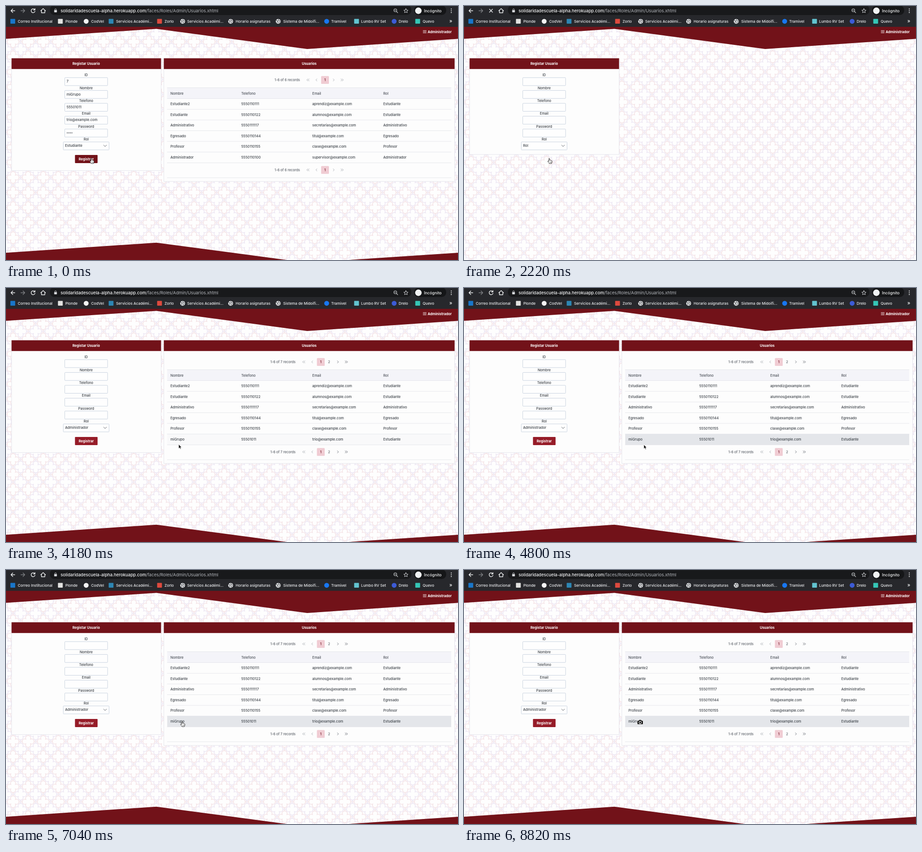
These frames come from a looping animation (998x561 px, 8920 ms). An HTML page:

```html
<!DOCTYPE html>
<html lang="es">
<head>
<meta charset="utf-8">
<title>Usuarios</title>
<style>
html, body { margin: 0; width: 100%; height: 100%; overflow: hidden; background: #fefefe; }
svg { display: block; width: 100%; height: 100%; }
text { font-family: Inter, "Open Sans", sans-serif; white-space: pre; }
</style>
</head>
<body>
<svg id="stage" viewBox="0 0 998 561" preserveAspectRatio="none">
  <defs>
    <path id="flower" d="M-5-5A5.6 5.6 0 1 1 5-5A5.6 5.6 0 1 1 5 5A5.6 5.6 0 1 1-5 5A5.6 5.6 0 1 1-5-5ZM-17 0H-13M13 0H17M0-17V-13M0 13V17"/>
    <pattern id="tiles" x="-1" y="62.3" width="33.3" height="33.3" patternUnits="userSpaceOnUse">
      <g fill="none" stroke-width="1.1">
        <use href="#flower" x="16.65" y="16.65" stroke="#f1d9dd"/>
        <g stroke="#e6ddef">
          <use href="#flower"/>
          <use href="#flower" x="33.3"/>
          <use href="#flower" y="33.3"/>
          <use href="#flower" x="33.3" y="33.3"/>
        </g>
      </g>
    </pattern>
  </defs>
  <rect width="998" height="561" fill="#fefefe"/>
  <rect y="46" width="998" height="515" fill="url(#tiles)"/>
  <path fill="#721219" d="M0 46H998V72.5L665 95L332 50.5L0 72.5Z"/>
  <path id="footer" fill="#721219" d="M0 561V545L332 522.7L620 561ZM756 561L998 545V561Z"/>
  <g id="page"></g>
  <g id="chrome"></g>
  <g id="hand" fill="#fff" stroke="#111" stroke-width=".9" stroke-linejoin="round">
    <path d="M-1.2 0C-1.2-1.4.8-1.4.8 0V3.2C1.4 2.6 2.5 2.8 2.6 3.6C3.2 3 4.2 3.3 4.3 4.1C5 3.7 5.9 4.1 5.9 5V7.2C5.9 8.6 4.9 9 4.8 10.4H-.4C-.8 8.8-2.8 7.4-3.5 5.9C-3.9 4.9-2.6 4.3-1.2 5.8Z"/>
    <path d="M1.2 6.3V8.6M2.7 6.3V8.6M4.1 6.3V8.6" fill="none" stroke-width=".5"/>
  </g>
  <path id="arrow" d="M0 0V9.3L2.2 7.3L3.7 10.7L5.3 10L3.9 6.7H6.7Z" fill="#111" stroke="#fff" stroke-width=".8"/>
  <g id="camera" stroke="#fff" stroke-width=".8">
    <path d="M-6.3-3.3H-3.4L-2.2-5.2H2.2L3.4-3.3H6.3V5H-6.3Z" fill="#0a0a0a" stroke-linejoin="round"/>
    <circle cy=".7" r="2.6" fill="#0a0a0a" stroke-width="1.1"/>
  </g>
</svg>
<script>
const LOOP = 8920, LOAD = 900, PARTIAL = 2140, READY = 2540;
const MAROON = '#721219', INK = '#3b4047', SOFT = '#5b6068', LINE = '#e5e5ec';
const $ = id => document.getElementById(id);

function add(parent, tag, attrs, content) {
  const el = document.createElementNS('http://www.w3.org/2000/svg', tag);
  for (const key in attrs) el.setAttribute(key, attrs[key]);
  if (content !== undefined) el.textContent = content;
  parent.appendChild(el);
  return el;
}
const group = parent => add(parent, 'g', {});
const rect = (p, x, y, width, height, fill, more) => add(p, 'rect', { x, y, width, height, fill, ...more });
const path = (p, d, stroke, width = 1, more) =>
  add(p, 'path', { d, fill: 'none', stroke, 'stroke-width': width, 'stroke-linecap': 'round', 'stroke-linejoin': 'round', ...more });
const label = (p, x, y, str, size = 7.6, weight = 550, fill = INK, anchor = 'start') =>
  add(p, 'text', { x, y: y + size * .36, 'font-size': size, 'font-weight': weight, fill, 'text-anchor': anchor }, str);
const title = (p, x, y, str) => label(p, x, y, str, 7.5, 700, '#fff', 'middle');
const show = (el, on) => el.setAttribute('display', on ? 'inline' : 'none');

// Browser bars
const chrome = $('chrome');
rect(chrome, 0, 0, 998, 46, '#27282c');
rect(chrome, 97, -2, 798, 22, '#18191b', { rx: 10 });
rect(chrome, 901, -1, 71, 21, '#151618', { rx: 10 });
path(chrome, 'M19.5 10.5H11M15 6.5L11 10.5L15 14.5', '#f1f3f4', 1.4);
path(chrome, 'M33 10.5H41.5M37.5 6.5L41.5 10.5L37.5 14.5', '#7d7f83', 1.4);
const reload = path(chrome, 'M63.2 7.8A4.3 4.3 0 1 0 64 11.6M64 5.6V8.8H60.8', '#f1f3f4', 1.4);
const stop = path(chrome, 'M56.2 7L63 13.8M63 7L56.2 13.8', '#f1f3f4', 1.4);
path(chrome, 'M76.8 10.5L82 5.8L87.2 10.5M78.3 9.8V15H85.7V9.8', '#f1f3f4', 1.4);
rect(chrome, 106.4, 9, 6, 5, '#d6d8db', { rx: .7 });
path(chrome, 'M107.7 9V7.8A1.7 1.7 0 0 1 111.1 7.8V9', '#d6d8db', .9);
label(chrome, 120.5, 10.5, 'solidaridadescuela-alpha.herokuapp.com', 9.5, 500, '#f4f5f6');
label(chrome, 309, 10.5, '/faces/Roles/Admin/Usuarios.xhtml', 9.6, 400, '#b5b8bd');
path(chrome, 'M862.8 9.5A3.2 3.2 0 1 1 856.4 9.5A3.2 3.2 0 1 1 862.8 9.5M862 12L865 15M858.2 9.5H861', '#c9cccf', 1.1);
path(chrome, 'M883 5.8L884.4 9L887.8 9.3L885.2 11.5L886 14.9L883 13.1L880 14.9L880.8 11.5L878.2 9.3L881.6 9Z', '#d6d8db');
add(chrome, 'circle', { cx: 910.5, cy: 10.5, r: 7.2, fill: '#f1f3f4' });
label(chrome, 923, 10.5, 'Incógnito', 8.7, 500, '#f4f5f6');
for (const cy of [6.6, 10.5, 14.4]) add(chrome, 'circle', { cx: 983.2, cy, r: 1.1, fill: '#f1f3f4' });

const bookmarks = [
  [15, 26, 'Correo Institucional', 'square', '#1976c9'],
  [120, 131, 'Plonde', 'square', '#e2e2e0'],
  [177, 188, 'CodVel', 'circle', '#f4f4f4'],
  [232, 243, 'Servicios Académi...', 'square', '#2d86b3'],
  [339, 350, 'Zorlo', 'square', '#dd4a3e'],
  [390, 400, 'Servicios Académi...', 'globe'],
  [496, 507, 'Horario asignaturas', 'globe'],
  [601, 612, 'Sistema de Midoifi...', 'globe'],
  [708, 718, 'Tramivel', 'circle', '#1877f2'],
  [774, 784, 'Lumbo RV Set', 'square', '#62c3cf'],
  [857, 867, 'Drelo', 'circle', '#3c5bd6'],
  [909, 920, 'Quevo', 'square', '#35c6b6']
];
for (const [x, textX, name, shape, color] of bookmarks) {
  if (shape === 'square') rect(chrome, x - 5.3, 28.5, 10.6, 10.6, color, { rx: 1 });
  else add(chrome, 'circle', { cx: x, cy: 33.8, r: 5.4, fill: color || '#e3e5e7' });
  if (shape === 'globe')
    path(chrome, `M${x - 4} 31.4L${x - 1} 33.2L${x - 2.2} 36.8M${x + .5} 29.5L${x + 1} 32L${x + 4} 33.2M${x + 1.4} 37.4L${x + 2} 35.2`, '#3c3e42', 1.2);
  label(chrome, textX, 33.8, name, 8.2, 500, '#eceef0');
}
label(chrome, 982, 33.5, '»', 11, 500, '#f1f3f4', 'middle');

// Page
const page = $('page');
path(page, 'M921 54.3H928M921 56.8H928M921 59.3H928', '#fff', .9);
label(page, 931, 57, 'Administrador', 7.6, 700, '#fff');

const formBox = rect(page, 12.5, 115.5, 330, 248, '#fdfdfd', { stroke: LINE });
rect(page, 12.3, 115.5, 330, 23.7, MAROON);
title(page, 177, 127.5, 'Registar Usuario');
const frame = { stroke: '#c3cedd', 'stroke-width': .9, rx: 1 };
['ID', 'Nombre', 'Telefono', 'Email', 'Password', 'Rol'].forEach((name, i) => {
  const y = 152.5 + i * 28.4;
  label(page, 177, y, name, 7.5, 550, INK, 'middle');
  if (i < 5) rect(page, 129.7, y + 5.7, 94.6, 17.6, '#fefefe', frame);
});
rect(page, 126.5, 300.2, 101, 17.6, '#fefefe', frame);
path(page, 'M215.6 307.2L218.8 310.4L222 307.2', '#565b63');
const role = label(page, 130.5, 308.5, '');
const filled = group(page);
['7', 'miGrupo', '55501011', 'trio@example.com'].forEach((v, i) => label(filled, 133.7, 166.5 + i * 28.4, v));
for (let i = 0; i < 4; i++) add(filled, 'circle', { cx: 135.3 + i * 3.4, cy: 280.3, r: 1.05, fill: INK });
const submit = group(page);
const button = rect(submit, 152.3, 329, 49.9, 18, MAROON, { rx: 1.2 });
title(submit, 177.2, 338, 'Registrar');

const table = group(page);
rect(table, 348.5, 115.5, 642, 272, '#fdfdfd', { stroke: LINE });
rect(table, 348.5, 115.5, 642, 23.7, MAROON);
title(table, 669.5, 127.5, 'Usuarios');
rect(table, 356, 180.5, 627, 24, '#f4f4f9');
const hover = rect(table, 356, 322.5, 627, 24, '#e4e6ea');
for (const y of [180.5, 204.5, 228.2, 251.8, 275.4, 299, 322.6, 346.4, 379.3])
  path(table, `M356 ${y}H983`, '#e4e5ea', .9);
const columns = [363, 519.5, 676.3, 833];
const row = (parent, y, cells, color) =>
  cells.forEach((cell, i) => label(parent, columns[i], y, cell, 7.6, 550, color));
row(table, 192.8, ['Nombre', 'Telefono', 'Email', 'Rol'], '#4b5058');
[
  ['Estudiante2', '5550110111', 'aprendiz@example.com', 'Estudiante'],
  ['Estudiante', '5550110122', 'alumnos@example.com', 'Estudiante'],
  ['Administrativo', '5550111117', 'secretarias@example.com', 'Administrativo'],
  ['Egresado', '5550110144', 'titul@example.com', 'Egresado'],
  ['Profesor', '5550110155', 'clase@example.com', 'Profesor']
].forEach((cells, i) => row(table, 216.2 + i * 23.6, cells));

// One variant of the list before saving, one after
function listing(total, shift, last) {
  const g = group(table);
  row(g, 334, last);
  for (const y of [163.3, 362]) {
    label(g, 593 + shift, y, `1-6 of ${total} records`, 7.4, 500, SOFT);
    rect(g, 695.8 + shift, y - 8.6, 17.2, 17.4, '#f0ccd3', { rx: 1.5 });
    label(g, 704.4 + shift, y, '1', 7.5, 600, '#7c2531', 'middle');
    if (total > 6) label(g, 713.3, y, '2', 7.5, 500, SOFT, 'middle');
    const chevron = (x, dir, color) =>
      path(g, `M${x - dir * 1.1} ${y - 2.4}L${x + dir * 1.3} ${y}L${x - dir * 1.1} ${y + 2.4}`, color, .9);
    const next = total > 6 ? '#5f646c' : '#a0a4ab', right = -shift;
    chevron(665.4 + shift, -1, '#a0a4ab');
    chevron(668.4 + shift, -1, '#a0a4ab');
    chevron(685.5 + shift, -1, '#a0a4ab');
    chevron(723.5 + right, 1, next);
    chevron(740.6 + right, 1, next);
    chevron(743.6 + right, 1, next);
  }
  return g;
}
const before = listing(6, 0, ['Administrador', '5550110100', 'supervisor@example.com', 'Administrador']);
const after = listing(7, -9.3, ['miGrupo', '55501011', 'trio@example.com', 'Estudiante']);

// Pointer tip: time, x, y
const track = [
  [0, 188.5, 337.5], [3350, 188.5, 337.5], [4350, 397, 346], [4850, 397, 346],
  [5500, 384, 338.5], [6000, 384, 338.5], [6700, 389, 335.5], [LOOP, 389, 335.5]
];
function pointer(t) {
  const i = track.findIndex(k => k[0] > t);
  const [t0, x0, y0] = track[i - 1], [t1, x1, y1] = track[i];
  const u = (t - t0) / (t1 - t0), e = u * u * (3 - 2 * u);
  return [x0 + (x1 - x0) * e, y0 + (y1 - y0) * e];
}

function update(t) {
  const loading = t >= LOAD && t < READY;
  const partial = t >= PARTIAL && t < READY;
  const saved = t >= READY;
  show(stop, loading);
  show(reload, !loading);
  show(filled, t < PARTIAL);
  for (const el of [table, submit, $('footer')]) show(el, !partial);
  show(before, !saved);
  show(after, saved);
  formBox.setAttribute('height', partial ? 212.5 : 248);
  role.textContent = saved ? 'Administrador' : partial ? 'Rol' : 'Estudiante';
  button.setAttribute('fill', saved ? '#961c28' : MAROON);

  const [x, y] = pointer(t);
  hover.setAttribute('opacity', Math.min(1, Math.max(0, (t - 4150) / 200)));
  const camera = t >= 8500;
  const arrow = !camera && t >= 3350 && t < 4950 && x > 202;
  show($('camera'), camera);
  show($('arrow'), arrow);
  show($('hand'), !camera && !arrow);
  $('camera').setAttribute('transform', `translate(${x} ${y + .5})`);
  for (const id of ['hand', 'arrow']) $(id).setAttribute('transform', `translate(${x} ${y})`);
}

const start = performance.now();
function tick() {
  update((performance.now() - start) % LOOP);
  requestAnimationFrame(tick);
}
tick();
</script>
</body>
</html>
```
